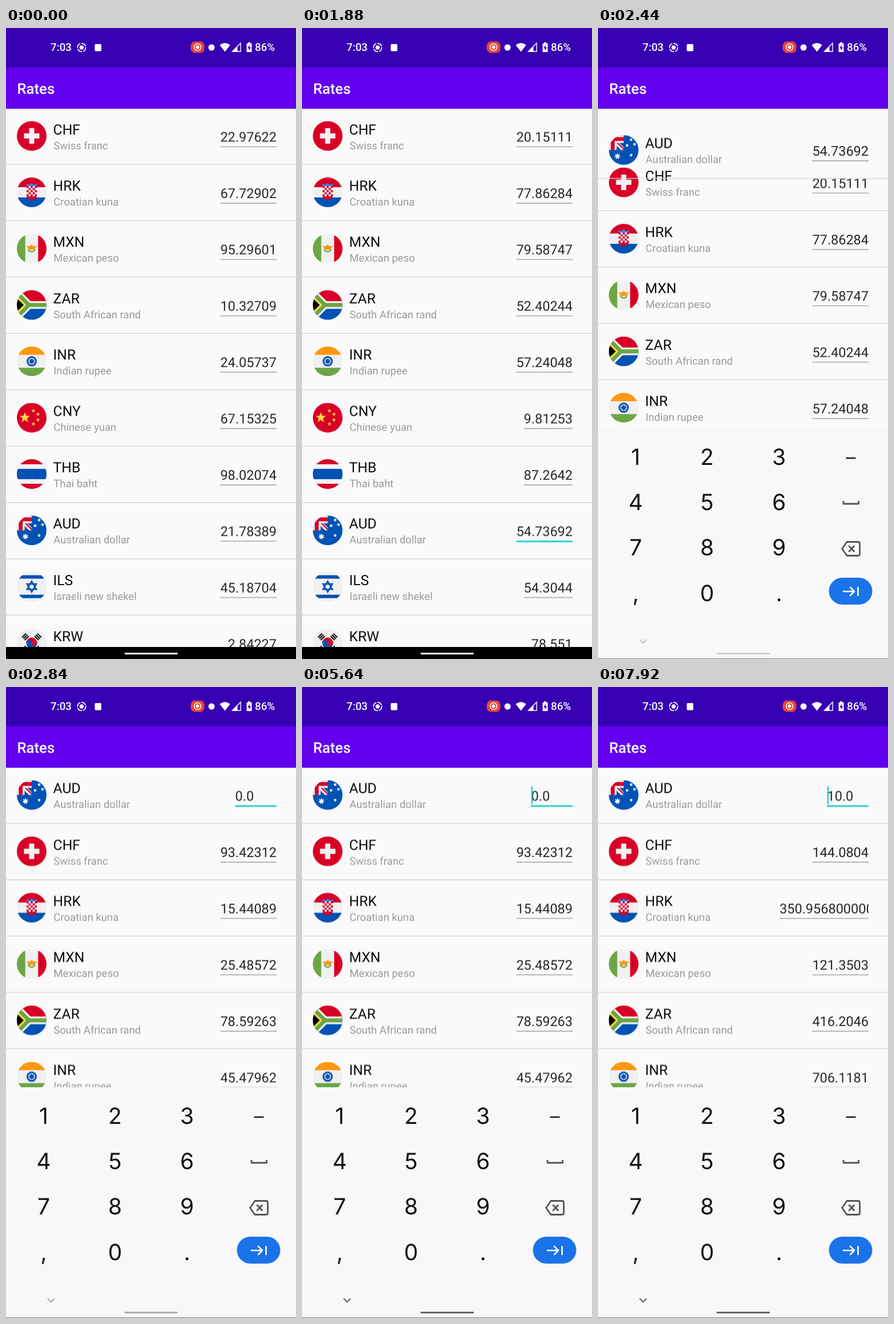
Write an HTML page that moves like this. It is 508 px wide and 1102 px high and loops after 8.44 s.

```html
<!DOCTYPE html>
<html lang="en">
<head>
<meta charset="utf-8">
<title>Rates</title>
<style>
html, body { margin: 0; width: 100%; height: 100%; overflow: hidden; background: #fafafa; }
svg { display: block; width: 508px; height: 1102px; font-family: Roboto, sans-serif; text-rendering: geometricPrecision; }
.code { font-size: 24.7px; fill: #0a0a0a; }
.name { font-size: 18.5px; fill: #9a9a9a; }
.value { font-size: 23.5px; fill: #262626; }
.key { font: 39px Inter, sans-serif; fill: #111; text-anchor: middle; }
.bar { font-weight: 500; fill: #fff; }
.line { fill: none; stroke-linecap: round; stroke-linejoin: round; }
</style>
</head>
<body>
<svg viewBox="0 0 508 1102">
  <defs>
    <clipPath id="disc"><circle r="26"/></clipPath>
    <clipPath id="field"><rect x="300" width="174" height="98"/></clipPath>
    <clipPath id="view"><rect y="140" width="508" height="941"/></clipPath>
  </defs>
  <rect width="508" height="1102" fill="#fafafa"/>
  <g id="list" clip-path="url(#view)"></g>

  <rect width="508" height="69" fill="#3700b3"/>
  <rect y="69" width="508" height="72" fill="#6200ee"/>
  <text class="bar" x="19.4" y="115" font-size="25.8">Rates</text>

  <g id="status" fill="#fff">
    <text class="bar" x="78" y="40.3" font-size="18.8">7:03</text>
    <circle cx="132.5" cy="34" r="3.7"/>
    <circle class="line" cx="132.5" cy="34" r="7.2" stroke="#fff" stroke-width="1.8" stroke-dasharray="8 3.31"/>
    <rect x="155.5" y="28" width="11.5" height="12.5" rx="2"/>
    <rect x="323.5" y="23.5" width="24" height="20" rx="8" fill="#ea4335"/>
    <circle cx="335.5" cy="33.5" r="3"/>
    <circle cx="335.5" cy="33.5" r="6" fill="none" stroke="#fff" stroke-width="1.6"/>
    <circle cx="360" cy="34" r="5.5"/>
    <path d="M374.5 30 Q383.5 22.5 392.5 30 L383.5 41.5Z"/>
    <path d="M411 26.5V41H396.5Z" fill="none" stroke="#fff" stroke-width="1.4"/>
    <path d="M405.5 32 V41.5 H396Z"/>
    <path d="M424 25h4v2h2.5v15h-9V27h2.5z"/>
    <path d="M427 29.5l-4 6h2.6v4l3.6-5.6h-2.5z" fill="#3700b3"/>
    <text class="bar" x="436" y="40.3" font-size="18.8">86%</text>
  </g>

  <rect y="1081" width="508" height="21"/>
  <g id="keyboard">
    <rect y="699" width="508" height="403" fill="#f8f8fb"/>
    <rect y="1101" width="508" height="1" fill="#777"/>
    <rect x="434.5" y="749.8" width="17" height="2.6" fill="#222"/>
    <g class="line" stroke="#555" stroke-width="2.8">
      <path d="M430 826v5h26.5v-5" stroke-linecap="butt"/>
      <path d="M436 897.5h19.5q3 0 3 3v18q0 3-3 3H436l-8.5-12zM440 905l8.5 9m0-9l-8.5 9"/>
    </g>
    <rect x="404.5" y="960" width="76" height="47" rx="23.5" fill="#1a73e8"/>
    <path class="line" d="M430 984h19m-7-7l7 7-7 7M455.5 977v14" stroke="#fff" stroke-width="2.6"/>
  </g>
  <path id="chevron" class="line" d="M73.5 1068.5l5.5 5.5 5.5-5.5" stroke="#666" stroke-width="2.1"/>
  <rect id="pill" x="207.5" y="1091" width="93.5" height="3" rx="1.5"/>
</svg>
<script>
const LOOP = 8440, TOP = 140.5, PITCH = 98.4, SCROLL = 229;
const RED = '#d80027', BLUE = '#0052b4', GREEN = '#6da544', WHITE = '#f0f0f0',
      ORANGE = '#ff9811', YELLOW = '#ffda44', TEAL = '#18d3d3';
const start = document.timeline.currentTime;
const $ = id => document.getElementById(id);

function add(parent, tag, attrs = {}, text = '') {
  const el = document.createElementNS('http://www.w3.org/2000/svg', tag);
  for (const k in attrs) el.setAttribute(k, attrs[k]);
  el.textContent = text;
  parent.append(el);
  return el;
}

// steps: [ms, value, easing to the next step]
function play(el, prop, steps, easing = 'linear') {
  const all = [...steps, [LOOP, steps[steps.length - 1][1]]];
  const frames = all.map(([ms, v, ease]) => ({ offset: ms / LOOP, [prop]: v, easing: ease || easing }));
  el.animate(frames, { duration: LOOP, iterations: Infinity }).startTime = start;
}
const toggle = (el, steps) => play(el, 'opacity', steps, 'step-end');

// Flag pieces, drawn around (0, 0) in a disc of radius 26
const box = (x, y, w, h, fill) => `<rect x="${x}" y="${y}" width="${w}" height="${h}" fill="${fill}"/>`;
const dot = (x, y, r, fill) => `<circle cx="${x}" cy="${y}" r="${r}" fill="${fill}"/>`;
const path = (d, fill) => `<path d="${d}" fill="${fill}"/>`;
const stroke = (d, color, w) => `<path d="${d}" fill="none" stroke="${color}" stroke-width="${w}"/>`;
const rows3 = (a, b, c, h) => box(-26, -26, 52, 52, b) + box(-26, -26, 52, 26 - h, a) + box(-26, h, 52, 26 - h, c);
function star(x, y, r, fill, n = 5, inner = 0.42) {
  const pts = Array.from({ length: 2 * n }, (_, i) => {
    const a = Math.PI * i / n, d = i % 2 ? r * inner : r;
    return `${(x + d * Math.sin(a)).toFixed(2)},${(y - d * Math.cos(a)).toFixed(2)}`;
  });
  return `<polygon points="${pts.join(' ')}" fill="${fill}"/>`;
}
function checks() {
  let s = box(-9, -11, 18, 18, WHITE) + path('M-9 7H9Q7 13 0 13T-9 7', RED);
  for (let i = 0; i < 25; i += 2) s += box(-9 + i % 5 * 3.6, -11 + Math.floor(i / 5) * 3.6, 3.6, 3.6, RED);
  return s + path('M-9-11V-15l4.5 2L0-16l4.5 3L9-15v4z', '#338af3');
}
function trigrams() {
  let s = '';
  for (const a of [45, 135, 225, 315])
    s += `<g transform="rotate(${a})">` + [-20, -16.7, -13.4].map(y => box(-5, y, 10, 2.2, '#111')).join('') + '</g>';
  return s;
}
const YBAR = 'M-30.8-26L-4.8 0H28M-30.8 26L-4.8 0';
const EAGLE = 'M9-4.5H2.3A2.3 2.3 0 0 0-2.3-4.5H-9Q-9-2.3-6.7-2.3Q-6.7 0-4.5 0' +
  'Q-4.5 2.3-2.2 2.3H2.2Q4.5 2.3 4.5 0Q6.7 0 6.7-2.3Q9-2.3 9-4.5z';
const flags = {
  CHF: box(-26, -26, 52, 52, RED) + box(-13.5, -4.5, 27, 9, WHITE) + box(-4.5, -13.5, 9, 27, WHITE),
  HRK: rows3(RED, WHITE, BLUE, 9) + checks(),
  MXN: box(-26, -26, 52, 52, WHITE) + box(-26, -26, 14.7, 52, GREEN) + box(11.3, -26, 15, 52, RED) +
    stroke('M-5.6 0A5.6 5.6 0 0 0 5.6 0', GREEN, 2.3) + path(EAGLE, ORANGE),
  ZAR: rows3(RED, WHITE, BLUE, 0) + stroke(YBAR, WHITE, 13.6) + stroke(YBAR, GREEN, 7) +
    path('M-35.6-26L-9.6 0-35.6 26z', YELLOW) + path('M-40-26L-14 0-40 26z', '#000'),
  INR: rows3(ORANGE, WHITE, GREEN, 11.3) + dot(0, 0, 9, BLUE) + dot(0, 0, 6, WHITE) + star(0, 0, 6, BLUE, 8, 0.55),
  CNY: box(-26, -26, 52, 52, RED) + star(-12, 0, 9.5, YELLOW) +
    [[3, -12], [11, -6], [11, 4], [3, 11]].map(([x, y]) => star(x, y, 3.8, YELLOW)).join(''),
  THB: rows3(RED, WHITE, RED, 17) + box(-26, -9, 52, 18, BLUE),
  AUD: box(-26, -26, 52, 52, BLUE) +
    path('M-26-26H0v13.6H-7.6L0-4.8V0H-4.8L-12.4-7.6V0H-26z', WHITE) +
    path('M-22.6-22.6H0v6.8H-15.8V0h-6.8zM-12.4-12.4h3.2L0-3.2V0z', RED) + star(-11, 11, 6, WHITE, 7, 0.5) +
    [[13, -18], [6, -8], [19, -10], [13, 9]].map(([x, y]) => star(x, y, 3.2, WHITE, 7, 0.5)).join(''),
  ILS: box(-26, -26, 52, 52, WHITE) + box(-26, -20, 52, 6, BLUE) + box(-26, 14, 52, 6, BLUE) +
    stroke('M0-9.5L8.2 4.7H-8.2zM0 9.5L8.2-4.7H-8.2z', BLUE, 2.4),
  KRW: box(-26, -26, 52, 52, WHITE) + dot(0, 0, 9.5, BLUE) +
    path('M-9.5 0A9.5 9.5 0 0 1 9.5 0A4.75 4.75 0 0 1 0 0A4.75 4.75 0 0 0-9.5 0', RED) + trigrams()
};

// code, name, the values shown one after another
const rates = [
  ['CHF', 'Swiss franc', '22.97622', '20.15111', '93.42312', '144.0804'],
  ['HRK', 'Croatian kuna', '67.72902', '77.86284', '15.44089', '350.9568000000'],
  ['MXN', 'Mexican peso', '95.29601', '79.58747', '25.48572', '121.3503'],
  ['ZAR', 'South African rand', '10.32709', '52.40244', '78.59263', '416.2046'],
  ['INR', 'Indian rupee', '24.05737', '57.24048', '45.47962', '706.1181'],
  ['CNY', 'Chinese yuan', '67.15325', '9.81253'],
  ['THB', 'Thai baht', '98.02074', '87.2642'],
  ['AUD', 'Australian dollar', '21.78389', '54.73692', '0.0', '10.0'],
  ['ILS', 'Israeli new shekel', '45.18704', '54.3044'],
  ['KRW', 'South Korean won', '2.84227', '78.551']
];
const PICK = 7;
const fades = [[40, 280], [2520, 2720], [7440, 7680]];
const typed = [5760, 5760];

function showValue(row, value, i, count, swaps) {
  const w = Math.min(156, Math.max(72.5, (value.length - 1) * 13.2 + 6.2));
  const x = 474 - w;
  const g = add(row, 'g', { 'clip-path': 'url(#field)' });
  add(g, 'text', { class: 'value', x, y: 57.6 }, value);
  add(g, 'rect', { x, y: 66.4, width: w, height: 1.3, fill: '#8c8c90' });
  const steps = [[0, i ? 0 : 1]];
  if (i) steps.push([swaps[i - 1][0], 0], [swaps[i - 1][1], 1]);
  if (i < count - 1) steps.push([swaps[i][0], 1], [swaps[i][1], 0]);
  play(g, 'opacity', steps);
}

function focusLine(row, x, steps) {
  toggle(add(row, 'rect', { x, y: 66.2, width: 474 - x, height: 2.6, fill: TEAL }), steps);
}

function caret(row, x, steps) {
  toggle(add(row, 'rect', { x, y: 32.5, width: 2.4, height: 32, fill: TEAL }), steps);
}

rates.forEach(([code, name, ...values], i) => {
  const row = add($('list'), 'g');
  const disc = add(row, 'g', { transform: 'translate(45 48)', 'clip-path': 'url(#disc)' });
  disc.innerHTML = flags[code];
  add(row, 'text', { class: 'code', x: 82.6, y: 45.2 }, code);
  add(row, 'text', { class: 'name', x: 83.3, y: 71.2 }, name);
  add(row, 'rect', { y: 97, width: 508, height: 1.4, fill: '#d3d3d6' });

  const swaps = i === PICK ? [fades[0], fades[1], typed] : fades;
  values.forEach((v, n) => showValue(row, v, n, values.length, swaps));

  const at = y => `translate(0px, ${y}px)`;
  const from = TOP + PITCH * i;
  const to = TOP + PITCH * (i === PICK ? 0 : i < PICK ? i + 1 : i);
  play(row, 'transform', [
    [0, at(from)], [2000, at(from)], [2000, at(from - SCROLL)],
    [2240, at(from - SCROLL), 'ease-in-out'], [2480, at(to)]
  ]);
  if (code === 'CNY' || code === 'THB') toggle(row, [[0, 1], [2160, 0]]);

  if (i === PICK) {
    focusLine(row, 375.4, [[0, 0], [1880, 1], [2160, 0]]);
    focusLine(row, 401.5, [[0, 0], [2720, 1], [6800, 0], [7560, 1]]);
    caret(row, 401.5, [[0, 0], [3640, 1], [4120, 0], [4640, 1], [5160, 0], [5640, 1], [5760, 0], [7920, 1]]);
    caret(row, 414, [[0, 0], [5760, 1], [6280, 0]]);
  }
});

[...'123456789,0.'].forEach((c, i) => add($('keyboard'), 'text', {
  class: 'key', x: [66, 191, 317][i % 3], y: 763 + 79.2 * Math.floor(i / 3)
}, c));

play($('keyboard'), 'transform', [
  [0, 'translateY(403px)'], [1920, 'translateY(403px)', 'cubic-bezier(0, 0, 0.2, 1)'], [2160, 'translateY(0px)']
]);
play($('chevron'), 'opacity', [[0, 0], [1780, 0], [3640, 1]]);
play($('pill'), 'fill', [[0, '#fff'], [1920, '#fff'], [3640, '#666']]);
</script>
</body>
</html>
```
